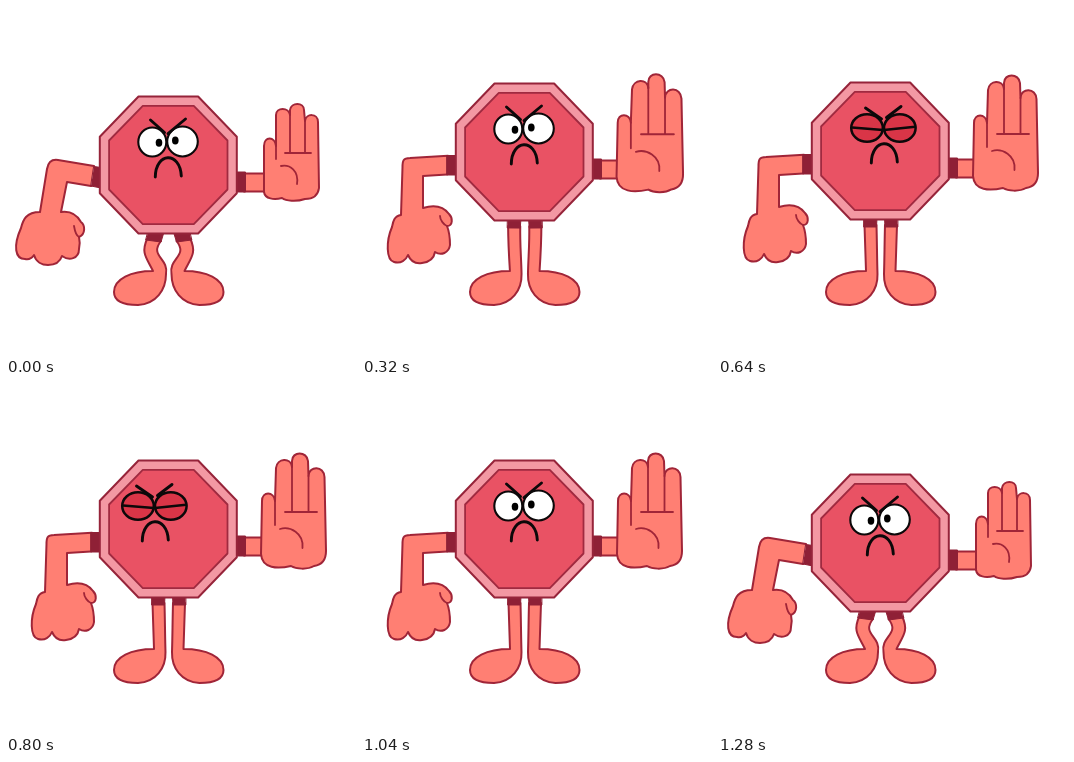
Recreate the animation shown at these times as an HTML page. Size 350 px wide and 350 px high, loop 1360 ms.

```html
<!DOCTYPE html>
<html lang="en">
<head>
<meta charset="utf-8">
<title>Angry stop sign</title>
<style>
  html, body { margin: 0; width: 100%; height: 100%; overflow: hidden; background: #fff; }
  svg { display: block; width: 100vw; height: 100vh; }
  path, ellipse { stroke-linecap: round; stroke-linejoin: round; }
  .skin { fill: #ff7f73; stroke: #a02538; stroke-width: 2; }
  .crease { fill: none; stroke: #a02538; stroke-width: 1.8; }
  .cuff { fill: #8f2036; stroke: #8f2036; stroke-width: 1; }
  .rim { fill: #f398a3; stroke: #96243a; stroke-width: 2; }
  .plate { fill: #e95264; stroke: #a02a40; stroke-width: 1.8; }
  .ink { fill: none; stroke: #0c0809; stroke-width: 2.9; }
  .white { fill: #fff; stroke: #0c0809; stroke-width: 2.1; }
  .lid { fill: #d93547; stroke: #0c0809; stroke-width: 2.5; }
</style>
</head>
<body>
<svg viewBox="0 0 350 350" aria-label="A stop sign character holding up its hand">
  <defs>
    <g id="leg">
      <path class="skin" id="shin"/>
      <path class="cuff" id="sock"/>
    </g>
  </defs>
  <use href="#leg"/>
  <use href="#leg" transform="translate(325.500) scale(-1 1)"/>
  <g id="body">
    <path class="skin" id="arm"/>
    <path class="crease" id="thumb"/>
    <path class="cuff" id="sleeve"/>
    <path class="skin" d="M238 167.500H262V185.500H238Z"/>
    <path class="cuff" d="M230 166H239.500V186H230Z"/>
    <path class="skin" id="hand"/>
    <path class="crease" id="lines"/>
    <path class="rim" id="rim"/>
    <path class="plate" id="plate"/>
    <g id="face">
      <g id="open">
        <ellipse class="white" cx="146.300" cy="136" rx="14" ry="14.500"/>
        <ellipse class="white" cx="176.500" cy="135.500" rx="15.300" ry="15"/>
        <ellipse cx="153" cy="136.800" rx="3.300" ry="4"/>
        <ellipse cx="169.300" cy="134.500" rx="3.300" ry="4"/>
        <path class="ink" d="M144.500 114L158.500 126.500M179.500 113L162 127.500"/>
      </g>
      <g id="squint">
        <ellipse class="lid" cx="145" cy="136" rx="15.800" ry="13.800"/>
        <ellipse class="lid" cx="177.800" cy="136" rx="15.800" ry="13.800"/>
        <path class="lid" d="M130 135.500L161 138M162 138L193 134.800"/>
        <path class="ink" d="M143.500 116L159.500 127M179 114.500L164.500 125.500"/>
      </g>
      <path class="ink" d="M149.300 171C149.500 146 174 145 175.300 170"/>
    </g>
  </g>
</svg>
<script>
const $ = id => document.getElementById(id);

// Each shape has a crouched and a risen pose with matching points.
const poses = {
  shin: [
    'M141 233C135 247 140 251 147 265C125 265 108 273 108 286C108 296 119 299 132 299C150 298 160 284 160 268C163 252 143 250 155 235',
    'M146.500 219C147 235 147.500 250 148 265C125 265 108 273 108 286C108 296 119 299 132 299C150 298 160 284 159.500 268C159 252 159 238 158.500 219'
  ],
  sock: [
    'M142 226L158 226L155 236L140 234Z',
    'M146 212L159 212L158.500 221L146 221Z'
  ],
  sleeve: [
    'M88 160.500L95 161.500L95 182L85 180Z',
    'M85 162.500L95 162.500L95 182L85 182Z'
  ],
  arm: [
    'M88 160L52 154C45 153 42 157 41 163L34 206C20 206 17 214 15 222C7 240 9 253 19 253C23 254 26 252 28 249C30 256 36 259 42 259C49 259 54 256 56 250C63 255 73 253 73 243C74 238 74 235 73 231C80 228 79 219 75 216C70 207 62 205 55 206L61 176L85 180',
    'M86 162.800L48 165C41 165 40.500 168 40.500 174L39 222C32 223 31 229 30 234C24 248 24 267 32 269C39 271 44 267 46 262C49 269 54 271 60 270C68 269 72 265 73 259C79 263 87 260 88 252C88 245 87 238 85 233C91 233 91 225 87 221C81 213 71 212 61 215L61 183L85 181.500'
  ],
  thumb: [
    'M73 231C71 230 69 226 68 220',
    'M85 233C82 232 78 227 78 223'
  ],
  hand: [
    'M258 186L258 140C258 130 269 130 270 140L270 109C270 101 283 101 284 109L284 104C285 96 298 96 298 104L299 115C300 107 312 107 312 116L313 182C312 190 306 193 299 193C290 196 280 195 276 192C268 194 259 193 258 186Z',
    'M255 184L256 131C256 121 268 121 269 131L270 98C271 88 285 87 286 97L286 91C286 81 301 81 302 91L302.500 106C303 95.500 318 95.500 318.500 107L320 181C320 191 315 195 308 196C301 200 290 199 285 196C272 199 256 199 255 184Z'
  ],
  lines: [
    'M270 140L270 153M284 109L284 147M299 115L299 147M279 147L305 147M275 160C284 158 293 165 291 178',
    'M269 131L269 155M286 96L286 142M302.500 106L302.500 142M279 142L311 142M274 159C284 156 298 163 296.500 178'
  ]
};

function pose(id, k) {
  const [from, to] = poses[id];
  const ends = to.match(/[\d.]+/g);
  let i = 0;
  $(id).setAttribute('d', from.replace(/[\d.]+/g, n => (+n + (ends[i++] - n) * k).toFixed(2)));
}

// r: half size, w and h: half lengths of the level and upright edges
function octagon(id, r, w, h) {
  const pts = [[-w, -r], [w, -r], [r, -h], [r, h], [w, r], [-w, r], [-r, h], [-r, -h]];
  $(id).setAttribute('d', 'M' + pts.map(([x, y]) => `${162.3 + x} ${159 + y}`).join('L') + 'Z');
}

const STEP = 80, STEPS = 17;
const REST = { lift: 14, fist: 1, palm: 1 };
const intro = [
  { lift: 0, fist: 0, palm: 0 },
  { lift: 6, fist: 0.02, palm: 0.04 },
  { lift: 11.5, fist: 0.07, palm: 0.14 },
  { lift: 14.5, fist: 1.05, palm: 1.25 },
  { lift: 13, fist: 1, palm: 1.15 },
  { lift: 13.5, fist: 1, palm: 1.05 }
];
const outro = {
  14: { lift: 14, fist: 0.35, palm: 0.96 },
  15: { lift: 7, fist: 0.06, palm: 0.3 },
  16: intro[0]
};

function draw(n) {
  const { lift, fist, palm } = intro[n] || outro[n] || REST;
  const shaking = n >= 5 && n <= 11;
  const turn = shaking ? 13 * Math.sin(0.3 * Math.PI * (n - 5)) : 0;
  for (const id of ['shin', 'sock']) pose(id, lift / 14);
  for (const id of ['arm', 'thumb', 'sleeve']) pose(id, fist);
  for (const id of ['hand', 'lines']) pose(id, palm);
  $('body').setAttribute('transform', `translate(0 ${-lift})`);
  $('face').setAttribute('transform', `translate(${turn.toFixed(2)} 0)`);
  $('open').style.display = shaking ? 'none' : '';
  $('squint').style.display = shaking ? '' : 'none';
}

octagon('rim', 68.5, 29.8, 28.2);
octagon('plate', 59.2, 25.5, 24.5);

const start = performance.now();
let shown = -1;
function tick() {
  const n = Math.floor((performance.now() - start) / STEP) % STEPS;
  if (n !== shown) draw(shown = n);
  requestAnimationFrame(tick);
}
tick();
</script>
</body>
</html>
```
